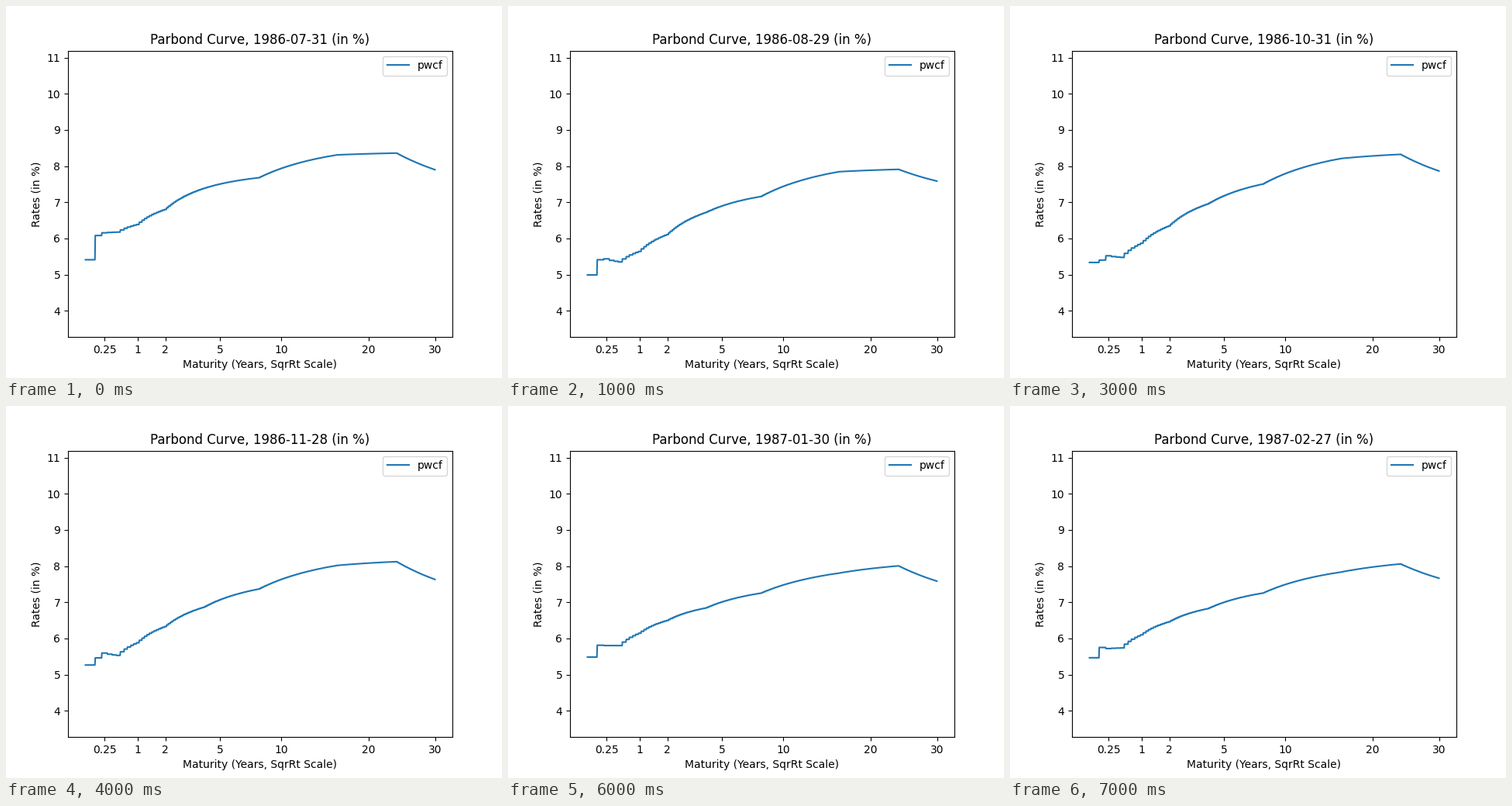
A matplotlib script for the animation above (8 s loop, 640 by 480 pixels).

```python
import numpy as np
import matplotlib.pyplot as plt
from matplotlib.animation import FuncAnimation

DISCOUNT = 0.07
KNOTS = np.array([1/12, 2/12, 3/12, 6/12, 1, 2, 4, 8, 16, 24, 30])
TICKS = [0.25, 1, 2, 5, 10, 20, 30]

# Evenly spaced on the square-root axis; rates hold for whole months.
root = np.linspace(np.sqrt(0.044), np.sqrt(29.98), 1000)
months = np.round(12 * root ** 2) / 12


def curve(*rates):
    return np.array(rates)


def blend(a, b, weight, shift, slope):
    """Mix two curves and tilt the result along the square-root axis."""
    return a + weight * (b - a) + shift + slope * np.sqrt(KNOTS)


def annuity(years):
    return (1 - np.exp(-DISCOUNT * years)) / DISCOUNT


def par_rates(rates):
    # Constant forwards between knots make par rates linear in 1 / annuity.
    return np.interp(-1 / annuity(months), -1 / annuity(KNOTS), rates)


# Par rates at the knots, one curve per month end.
jul = curve(5.41, 6.08, 6.155, 6.175, 6.385, 6.80, 7.385, 7.68, 8.31, 8.36, 7.90)
aug = curve(4.99, 5.41, 5.435, 5.35, 5.64, 6.105, 6.72, 7.16, 7.845, 7.91, 7.585)
sep = curve(5.36, 5.465, 5.48, 5.615, 5.94, 6.555, 7.28, 7.70, 8.425, 8.475, 8.015)
octo = curve(5.335, 5.40, 5.52, 5.475, 5.865, 6.345, 6.955, 7.505, 8.21, 8.325, 7.865)
dec = curve(5.04, 5.79, 6.00, 5.895, 6.14, 6.535, 6.905, 7.385, 8.05, 8.295, 7.79)
feb = curve(5.465, 5.75, 5.72, 5.737, 6.10, 6.46, 6.825, 7.255, 7.835, 8.06, 7.665)
nov = blend(octo, dec, 0.2, 0, -0.04)
jan = blend(dec, feb, 0.9, 0.07, -0.03)
CURVES = [jul, aug, sep, octo, nov, dec, jan, feb]

# Last business day of each month.
next_months = np.datetime64("1986-08") + np.arange(len(CURVES))
DATES = np.busday_offset(next_months.astype("datetime64[D]"), -1, roll="forward")

fig, ax = plt.subplots(figsize=(6.4, 4.8), dpi=100)
line, = ax.plot(root, par_rates(jul), label="pwcf")
title = ax.set_title("")
ax.set_xticks(np.sqrt(TICKS), [str(t) for t in TICKS])
ax.set_ylim(3.271, 11.194)
ax.set_xlabel("Maturity (Years, SqrRt Scale)")
ax.set_ylabel("Rates (in %)")
ax.legend(loc="upper right")


def draw(i):
    line.set_ydata(par_rates(CURVES[i]))
    title.set_text(f"Parbond Curve, {DATES[i]} (in %)")
    return line, title


anim = FuncAnimation(fig, draw, frames=len(CURVES), interval=1000, repeat=True)
plt.show()
```
